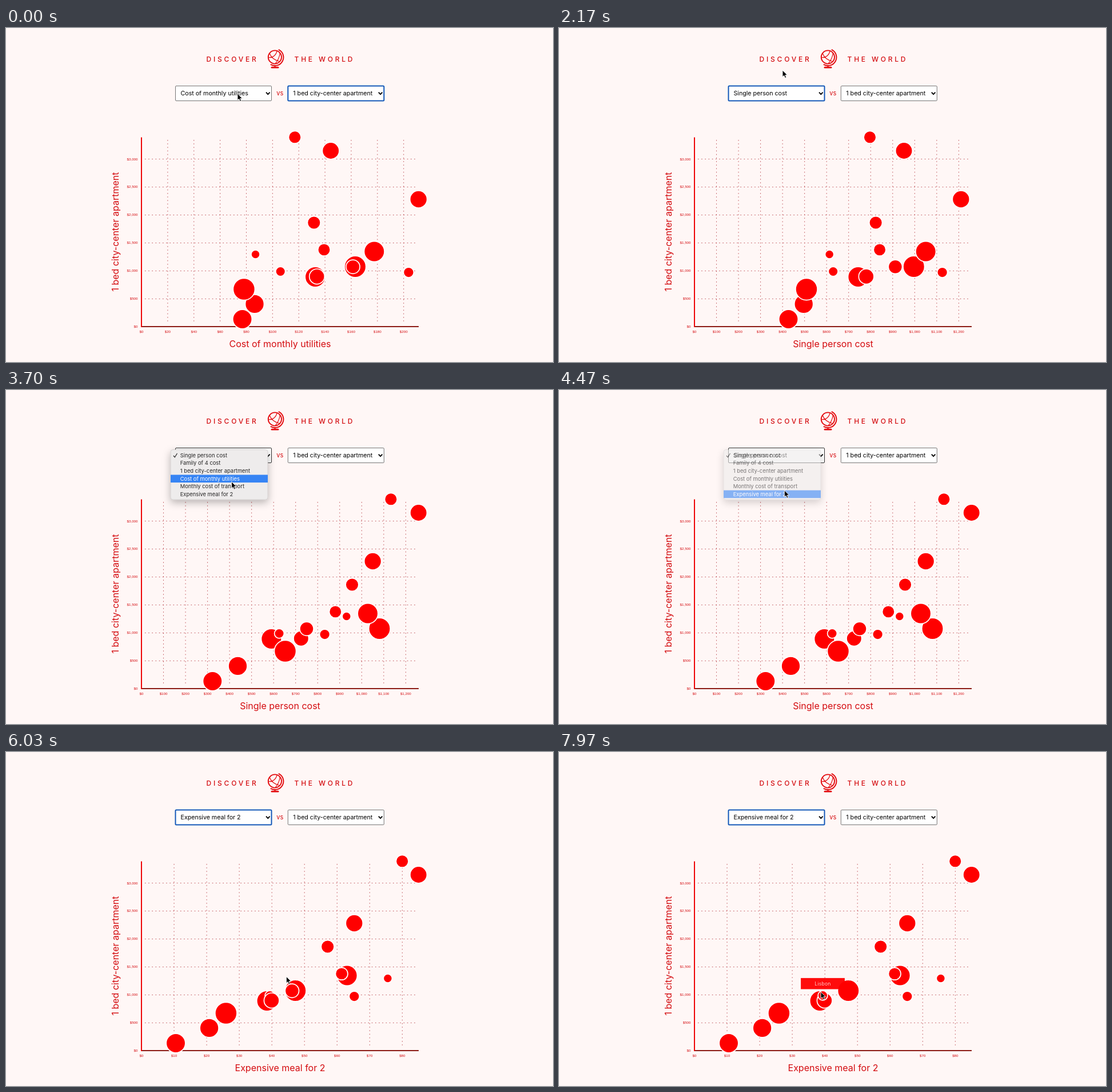
An HTML page for the animation above (8000 ms loop, 957 by 585 pixels).

```html
<!DOCTYPE html>
<html lang="en">
<head>
<meta charset="utf-8">
<title>Discover the world</title>
<style>
  html, body { margin: 0; width: 100%; height: 100%; overflow: hidden; background: #fff7f6; }
  svg { display: block; width: 100%; height: 100%; font-family: Inter, "Open Sans", sans-serif; }
  .head { font-size: 12px; font-weight: 500; letter-spacing: 3.8px; fill: #d40c10; }
  .axis { font-size: 16px; fill: #d40c10; text-anchor: middle; }
  .tick { font: 6.2px "Liberation Sans", Arial, sans-serif; fill: #d40c10; }
  .grid { stroke: #b8434a; stroke-width: 1; stroke-dasharray: 1.5 4.7; }
  .pick { font-size: 10.65px; fill: #000; }
  .item { font-size: 9.4px; }
  .tip { font-size: 8.6px; font-weight: 300; letter-spacing: .3px; fill: #fff; text-anchor: middle; }
</style>
</head>
<body>
<svg viewBox="0 0 957 585">
  <defs>
    <filter id="shade" x="-30%" y="-50%" width="160%" height="200%">
      <feDropShadow dx="0" dy="5" stdDeviation="7" flood-color="#000" flood-opacity=".28"/>
    </filter>
  </defs>
  <rect width="957" height="585" fill="#fff7f6"/>

  <text class="head" x="350.5" y="58.8">DISCOVER</text>
  <text class="head" x="504.5" y="58.8">THE WORLD</text>
  <g fill="none" stroke="#e3090d" stroke-width="1.9" stroke-linecap="round">
    <circle cx="470.4" cy="51" r="11.6"/>
    <path d="M477.4 38.2A14.7 14.7 0 1 1 463.5 64.1M470.5 66v3"/>
    <path d="M465 69.2h11" stroke-width="2.8"/>
    <path d="M461.5 45Q465 55 478.5 58.500M479.300 44Q478 54 471.500 62M460 51.500Q470 53 474.500 40" stroke-width="1.2"/>
  </g>

  <g id="selects"></g>
  <text x="473.3" y="118.2" font-size="11" fill="#d40c10">vs</text>

  <g id="yGrid"></g>
  <g id="xGrid"></g>
  <path d="M237 523H722" stroke="#8c1c16" stroke-width="2"/>
  <path d="M237 191.500V524" stroke="#ee0508" stroke-width="2"/>
  <text class="axis" transform="translate(197 357) rotate(-90)">1 bed city-center apartment</text>
  <text class="axis" id="xLabel" x="479.5" y="559"></text>

  <g id="dots" fill="#f00"></g>
  <g id="menu"></g>
  <path id="cursor" d="M0 0V11.600L2.700 9.200L4.600 13.500L6.700 12.600L4.800 8.400H8.500Z"
    fill="#000" stroke="#fff" stroke-width=".9" stroke-linejoin="round"/>
</svg>
<script>
const LOOP = 8000, ROW = 13.57;
const $ = id => document.getElementById(id);

function add(parent, tag, attrs, text) {
  const el = document.createElementNS('http://www.w3.org/2000/svg', tag);
  for (const k in attrs) el.setAttribute(k, attrs[k]);
  if (text !== undefined) el.textContent = text;
  parent.appendChild(el);
  return el;
}
const set = (el, attrs) => { for (const k in attrs) el.setAttribute(k, attrs[k]); };
const clamp = v => Math.max(0, Math.min(1, v));
const ramp = (t, from, len) => clamp((t - from) / len);
const cubic = p => p < .5 ? 4 * p ** 3 : 1 - 4 * (1 - p) ** 3;
const smooth = p => p * p * (3 - 2 * p);

const options = ['Single person cost', 'Family of 4 cost', '1 bed city-center apartment',
  'Cost of monthly utilities', 'Monthly cost of transport', 'Expensive meal for 2'];

// Chosen option, tick value step, tick spacing, tick count
const views = [
  { option: 3, step: 20, gap: 45.87, count: 10 },
  { option: 0, step: 100, gap: 38.53, count: 12 },
  { option: 5, step: 10, gap: 57.04, count: 8 }
];
const changes = [1978, 4614], MOVE = 500;

// y, radius, x in each view, back to front
const cities = [
  [418, 18, 611, 653.5, 506.3],
  [436, 17, 541, 464.3, 456.5],
  [510, 16, 413.5, 361.3, 297],
  [483.4, 15.7, 435, 405.5, 355.6],
  [457.5, 18.3, 416.4, 488.5, 384.9],
  [391.5, 17, 644.3, 633, 596.7],
  [300, 14.2, 721.7, 641.7, 609.3],
  [215, 14, 568.2, 721.7, 721.7],
  [426.5, 7.6, 480.2, 478, 461.5],
  [435.3, 12.5, 544, 516.3, 464.7],
  [418.2, 11.3, 607, 526, 500.4],
  [341, 10.6, 538.8, 605.5, 562.7],
  [388.4, 10, 556.5, 576.3, 587.2],
  [191.3, 10.1, 505.3, 673.4, 693.2],
  [428.1, 8.2, 704.4, 557.6, 609.3],
  [396.4, 6.8, 436.5, 595.8, 667.9]
];
const hovers = [
  { city: 0, name: 'Tokyo', from: 6080, to: 6930 },
  { city: 8, name: 'Lisbon', from: 7700, to: LOOP }
];
const menus = [{ open: 330, close: 1800, option: 3 }, { open: 2900, close: 4400, option: 0 }];

// time, x, y of the pointer tip
const path = [[0, 405, 115], [300, 404, 113], [970, 404, 113], [1650, 391, 74], [2500, 391, 74],
  [2850, 395.5, 108], [3250, 395.5, 108], [3900, 394.3, 175.8], [5070, 394.3, 175.8], [6250, 500, 415],
  [6600, 498, 418], [6880, 482.5, 420], [7400, 482, 420], [7850, 458, 420.3], [LOOP, 458, 420.3]];

const money = v => '$' + v.toLocaleString('en-US');

function makeSelect(x, label) {
  const box = add($('selects'), 'rect', { x, y: 101.500, width: 168, height: 26, rx: 1.5, fill: '#fff' });
  const text = add($('selects'), 'text', { class: 'pick', x: x + 9, y: 118.2 }, label);
  add($('selects'), 'path', { d: `M${x + 158.5} 112.600l3.300 3.500l3.300 -3.500`, fill: 'none', stroke: '#000', 'stroke-width': 1.8 });
  return { box, text };
}
const left = makeSelect(296.5, '');
const right = makeSelect(493.3, options[2]);

function border(box, focused, color) {
  set(box, { stroke: focused ? '#1458b8' : color, 'stroke-width': focused ? 2 : 1 });
}

for (let i = 0; i <= 6; i++) {
  const y = 523 - i * 48.95;
  if (i) add($('yGrid'), 'path', { class: 'grid', d: `M243 ${y + .3}H720` });
  add($('yGrid'), 'text', { class: 'tick', x: 230.5, y: y + 2.2, 'text-anchor': 'end' }, money(i * 500));
}
const xGrids = views.map(v => {
  const g = add($('xGrid'), 'g', {});
  for (let i = 0; i <= v.count; i++) {
    const x = 237 + i * v.gap;
    if (i) add(g, 'path', { class: 'grid', d: `M${x} 196V518` });
    add(g, 'text', { class: 'tick', x, y: 534.2, 'text-anchor': 'middle' }, money(i * v.step));
  }
  return g;
});

const dots = cities.map(([cy, r]) => {
  const g = add($('dots'), 'g', {});
  add(g, 'circle', { cy, r: r + .8, stroke: '#fff', 'stroke-width': 1.7 });
  return g;
});
hovers.forEach(h => {
  const [y, r] = cities[h.city], top = y - r - 23;
  h.tip = add(dots[h.city], 'g', {});
  add(h.tip, 'rect', { x: -38.4, y: top, width: 76.8, height: 19.5 });
  add(h.tip, 'text', { class: 'tip', x: 0, y: top + 12.8 }, h.name);
});

const menu = $('menu');
add(menu, 'rect', { x: 288, y: 104.500, width: 170, height: 87.5, rx: 4, fill: '#eeecec', stroke: '#c4c0c0', 'stroke-width': .6, filter: 'url(#shade)' });
const bar = add(menu, 'rect', { x: 288, width: 170, height: ROW, fill: '#3684f4' });
const items = options.map((o, i) => add(menu, 'text', { class: 'item', x: 304.7, y: 117.9 + i * ROW }, o));
const check = add(menu, 'path', { d: 'M293 115l2.300 2.800l4.200 -6.800', fill: 'none', 'stroke-width': 1.2 });

function pointerAt(t) {
  const i = path.findIndex((p, n) => n && t <= p[0]);
  const a = path[i - 1], b = path[i], p = smooth(ramp(t, a[0], b[0] - a[0]));
  return [a[1] + (b[1] - a[1]) * p, a[2] + (b[2] - a[2]) * p];
}

function drawMenu(t, tipY) {
  const m = menus.find(m => t >= m.open && t < m.close + 180);
  menu.style.display = m ? '' : 'none';
  if (!m) return false;
  const shift = -m.option * ROW;
  const over = Math.max(0, Math.min(5, Math.round((tipY - 114.5 - shift) / ROW)));
  set(menu, { transform: `translate(0 ${shift})`, opacity: 1 - ramp(t, m.close, 180) });
  set(bar, { y: 107.8 + over * ROW });
  items.forEach((el, i) => set(el, { fill: i === over ? '#fff' : '#242424' }));
  set(check, { transform: `translate(0 ${m.option * ROW})`, stroke: over === m.option ? '#fff' : '#242424' });
  return true;
}

let stacked = -1;
function stack(raised) {
  if (raised === stacked) return;
  stacked = raised;
  dots.forEach(g => $('dots').appendChild(g));
  hovers.slice(0, raised).forEach(h => $('dots').appendChild(dots[h.city]));
}

function draw(t) {
  const now = changes.filter(c => t >= c).length;
  const label = options[views[now].option];
  left.text.textContent = $('xLabel').textContent = label;
  xGrids.forEach((g, i) => { g.style.display = i === now ? '' : 'none'; });

  const p = now ? cubic(ramp(t, changes[now - 1], MOVE)) : 1;
  cities.forEach((c, i) => {
    const to = c[2 + now], from = now ? c[1 + now] : to;
    set(dots[i], { transform: `translate(${from + (to - from) * p} 0)` });
  });
  hovers.forEach(h => set(h.tip, { opacity: ramp(t, h.from, 285) * (1 - ramp(t, h.to, 250)) }));
  stack(hovers.filter(h => t >= h.from).length);

  const [x, y] = pointerAt(t);
  set($('cursor'), { transform: `translate(${x} ${y})` });
  const open = drawMenu(t, y), clicked = t >= menus[0].open;
  border(left.box, clicked && !open, open ? '#333' : '#767676');
  border(right.box, !clicked, '#767676');
}

const start = performance.now();
function frame() {
  draw((performance.now() - start) % LOOP);
  requestAnimationFrame(frame);
}
frame();
</script>
</body>
</html>
```
